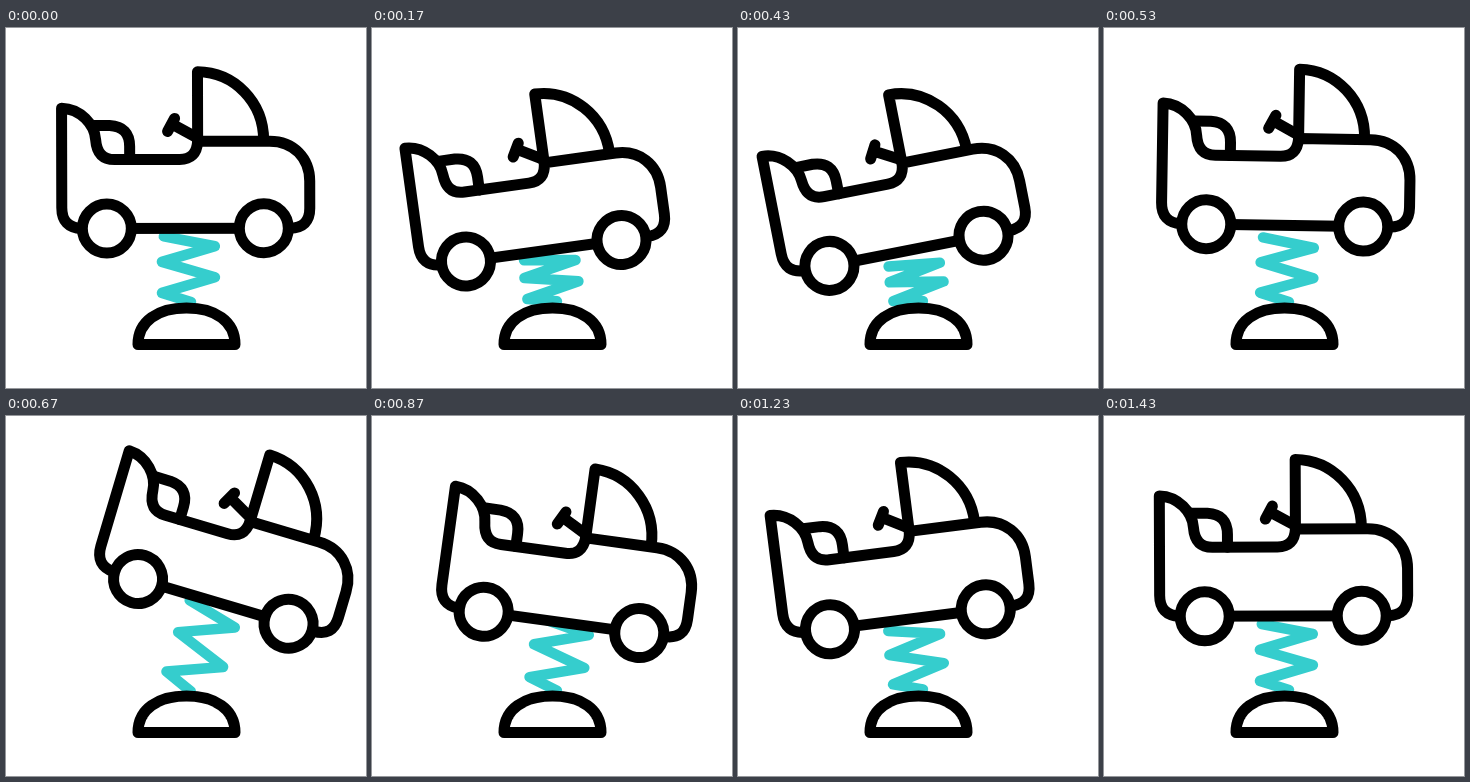
Animation, 360 px wide and 360 px high, one loop 1.67 s. Source, as an HTML page:

```html
<!DOCTYPE html>
<html lang="en">
<head>
<meta charset="utf-8">
<title>Spring rider</title>
<style>
  html, body { margin: 0; width: 100%; height: 100%; overflow: hidden; background: #fff; }
  svg { display: block; width: 100vw; height: 100vh; }
  .ink { fill: none; stroke: #000; stroke-width: 11; stroke-linecap: round; stroke-linejoin: round; }
  .solid { fill: #fff; }
  #spring { stroke: #35cdcd; stroke-width: 10.5; }
</style>
</head>
<body>
<svg viewBox="0 0 360 360">
  <polyline id="spring" class="ink"/>
  <path class="ink solid" d="M132 316.5H229C229 293 209 280 180.5 280C152 280 132 293 132 316.5Z"/>
  <g id="car" class="ink">
    <path class="solid" d="M76 200Q56 199 56 179V79.500C75 80 89 96 90 111C91 124 97 131 109 131H174Q191 131 192 113H264C288 113 304 130 304 153V180Q304 200 284 200Z"/>
    <path d="M192 113V43.500C229 44 258 74 258 112"/>
    <path d="M87 97H104Q124 98 124 118V131"/>
    <path d="M169 90L162 103M167 96L189 108"/>
    <circle class="solid" cx="101" cy="200" r="24.5"/>
    <circle class="solid" cx="258" cy="200" r="24.5"/>
  </g>
</svg>
<script>
  const LOOP = 1670, REST = 1430, START = -20;

  const car = document.getElementById('car');
  const spring = document.getElementById('spring');

  // Ease in and out through evenly spaced poses, then hold the last
  function sway(t, step, ...poses) {
    const pos = Math.min((t - START) / step, poses.length - 1);
    const i = Math.min(Math.floor(pos), poses.length - 2);
    const p = pos - i;
    return poses[i] + (poses[i + 1] - poses[i]) * p * p * (3 - 2 * p);
  }

  // Zigzag above the pivot; only its height stretches
  function coil(stretch) {
    const points = [[-22, -66 * stretch]];
    for (let i = 0; i < 4; i++) {
      points.push([i % 2 ? -24 : 29, (15.6 * i - 56) * stretch]);
    }
    points.push([5, 0]);
    return points.join(' ');
  }

  // Thirty poses a second, on a 10 ms clock
  function snap(t) {
    const part = t % 100;
    return Math.min(REST, t - part + (part < 30 ? 0 : part < 70 ? 30 : 70));
  }

  function draw() {
    const t = snap(performance.now() % LOOP);
    const tilt = sway(t, 370, 0, -15.1, 18.2, -10.7, 0);
    const lift = sway(t, 335, 79, 42, 98, 64, 79);
    const stretch = sway(t, 350, 1, 0.44, 1.32, 0.86, 1);

    car.setAttribute('transform',
      `translate(179.5 279) rotate(${tilt}) translate(-179.5 ${-200 - lift})`);
    spring.setAttribute('points', coil(stretch));
    spring.setAttribute('transform', `translate(180 274) rotate(${tilt})`);
    requestAnimationFrame(draw);
  }
  draw();
</script>
</body>
</html>
```
